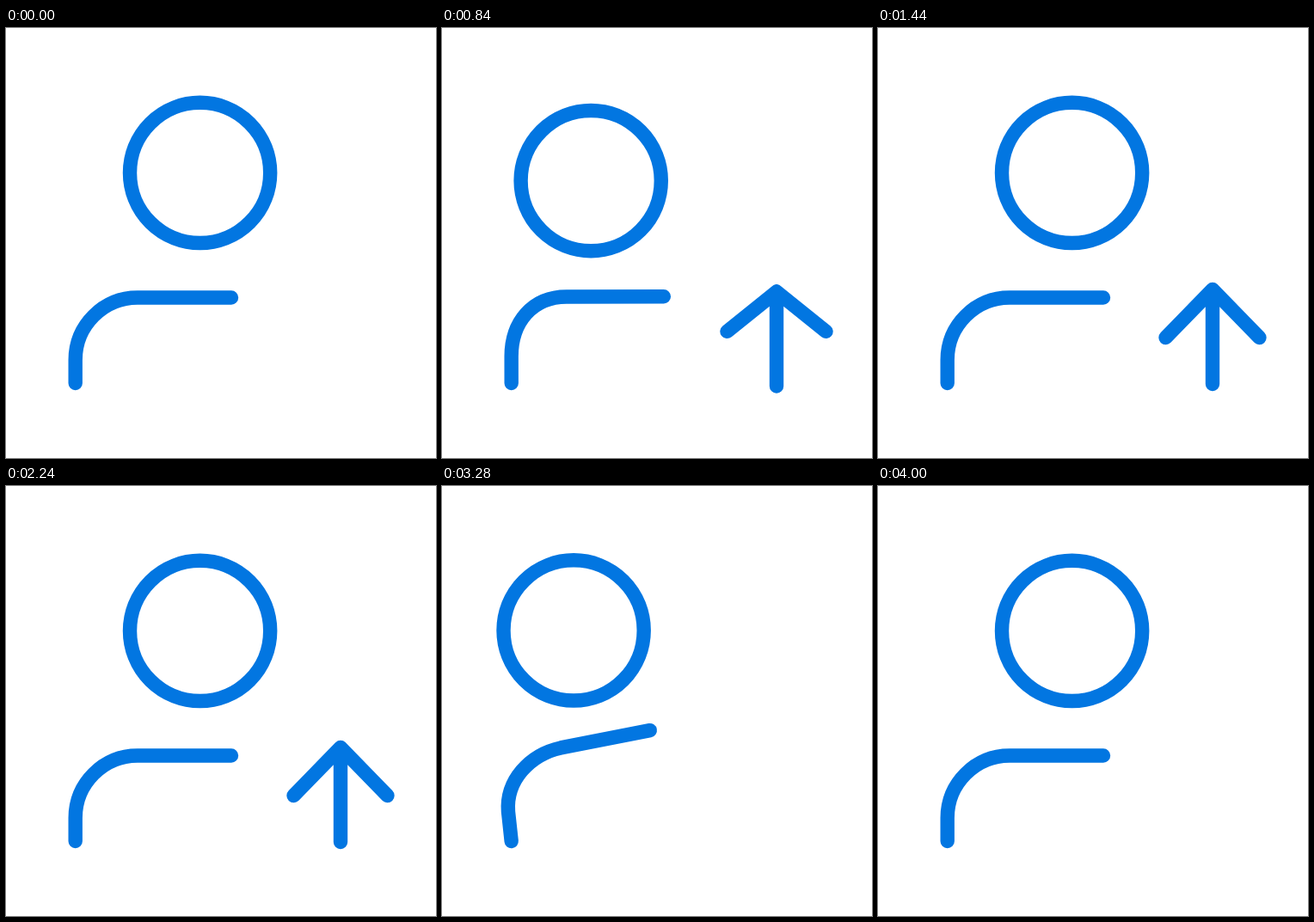
Write an HTML page that moves like this. It is 500 px wide and 500 px high and loops after 4040 ms.

```html
<!DOCTYPE html>
<html lang="en">
<head>
<meta charset="utf-8">
<title>User with arrow</title>
<style>
  html, body { margin: 0; width: 100%; height: 100%; overflow: hidden; background: #fff; }
  svg { display: block; width: 100vw; height: 100vh; }
</style>
</head>
<body>
<svg viewBox="0 0 500 500" fill="none" stroke="#0276e1" stroke-width="16.4"
     stroke-linecap="round" stroke-linejoin="round">
  <circle id="head" r="81.6"/>
  <path id="body"/>
  <path id="arrow"/>
</svg>
<script>
const LOOP = 4040, STEP = 40;
const NUDGE_REPEAT = 2560; // the person is pushed again when the arrow leaves
const [head, body, arrow] = ['head', 'body', 'arrow'].map(id => document.getElementById(id));

const swing = u => (1 - Math.cos(Math.PI * u)) / 2;
const easeOut = u => 1 - (1 - u) ** 3;
const launch = u => u ** 3.2;

// Eased progress from 0 to 1 between two times.
const ramp = (t, from, to, ease = swing) =>
  ease(Math.min(1, Math.max(0, (t - from) / (to - from))));

function drawPerson(t) {
  // The head is thrown left, overshoots to the right and settles.
  head.setAttribute('cx', 225.6 - 72.5 * ramp(t, 280, 722)
    + 87.5 * ramp(t, 742, 1050) - 15 * ramp(t, 1050, 1430));
  head.setAttribute('cy', 168.4 - 11 * ramp(t, 280, 560)
    + 21 * ramp(t, 560, 880) - 10 * ramp(t, 880, 1160));

  // The shoulder lifts and falls back, slightly squeezed on landing.
  const lift = 1.02 * (ramp(t, 285, 635) - ramp(t, 635, 850));
  const squeeze = ramp(t, 730, 840) - ramp(t, 840, 1040);
  const x1 = 80.7 - 5.5 * lift, y1 = 386 - 11 * lift - 4 * squeeze;
  const x2 = 153 - 22 * lift - 8 * squeeze, y2 = 313.5 - 13.5 * lift - squeeze;
  const x3 = 262 - 30 * lift - 4 * squeeze, y3 = 313.5 - 43.5 * lift - squeeze;
  body.setAttribute('d', `M80.7 413 L${x1} ${y1}
    C${x1 - 4 * lift} ${y1 - 40 + 6 * lift} ${x2 - 40 + 5 * lift} ${y2 + 12 * lift}
    ${x2} ${y2} L${x3} ${y3}`);
}

function drawArrow(t) {
  // Flies in from below, bounces, rests, dips and shoots out at the top.
  const y = 520 - 228 * ramp(t, 220, 480, easeOut) + 16 * ramp(t, 480, 770)
    - 4 * ramp(t, 770, 940) + 33 * ramp(t, 2460, 2800) - 667 * ramp(t, 2800, 3120, launch);
  // The wings fold while rising and spread while braking.
  const dx = 37 + 25 * ramp(t, 400, 740) - 9 * ramp(t, 750, 930) + 1.5 * ramp(t, 930, 1120)
    + 10 * ramp(t, 2480, 2860) - 27 * ramp(t, 2860, 3050);
  const dy = 72 - 26 * ramp(t, 420, 820) + 10 * ramp(t, 820, 1000)
    - 6 * ramp(t, 2480, 2840) + 22 * ramp(t, 2840, 3050);
  arrow.setAttribute('d',
    `M389 ${y + 110} V${y} M${389 - dx} ${y + dy} L389 ${y} L${389 + dx} ${y + dy}`);
}

const start = performance.now();

function draw() {
  const t = Math.floor((performance.now() - start) % LOOP / STEP) * STEP;
  drawPerson(t < NUDGE_REPEAT ? t : t - NUDGE_REPEAT);
  drawArrow(t);
  requestAnimationFrame(draw);
}
draw();
</script>
</body>
</html>
```
